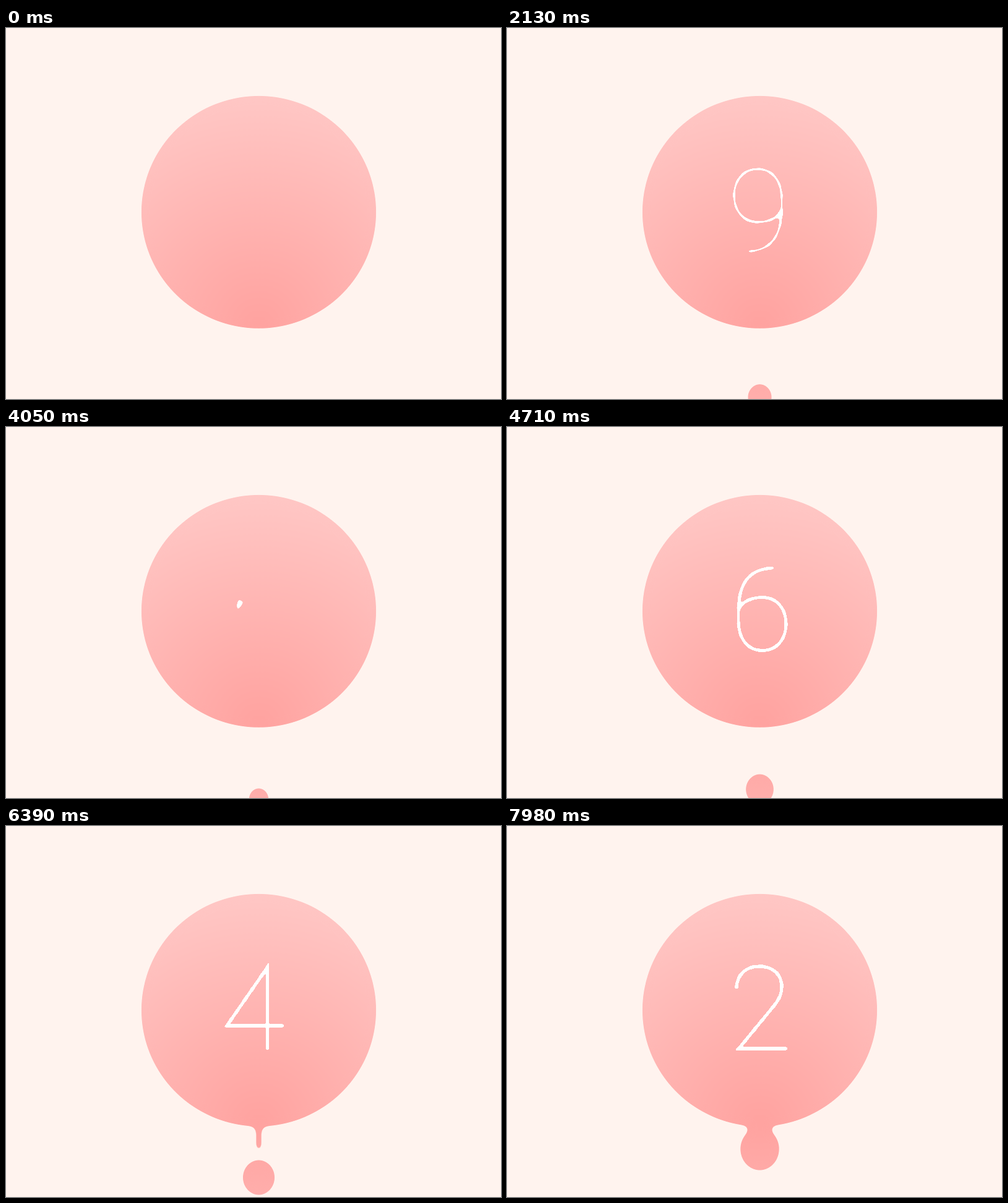
Animation, 800 px wide and 600 px high, one loop 8 s. Source, as an HTML page:

```html
<!DOCTYPE html>
<html lang="en">
<head>
<meta charset="utf-8">
<title>Dripping countdown</title>
<style>
  html, body { margin: 0; width: 100%; height: 100%; overflow: hidden; background: #fff3ee; }
  svg { display: block; width: 100vw; height: 100vh; }
</style>
</head>
<body>
<svg viewBox="0 0 800 600" role="img" aria-label="Countdown">
  <defs>
    <radialGradient id="pink" gradientUnits="userSpaceOnUse" cx="409" cy="480" r="372">
      <stop offset="0" stop-color="#ffa29f"/>
      <stop offset="1" stop-color="#ffc7c5"/>
    </radialGradient>
    <filter id="goo" filterUnits="userSpaceOnUse" x="0" y="0" width="800" height="600" color-interpolation-filters="sRGB">
      <feGaussianBlur stdDeviation="6"/>
      <feColorMatrix values="1 0 0 0 0  0 1 0 0 0  0 0 1 0 0  0 0 0 16 -7.5"/>
    </filter>
    <filter id="melt" filterUnits="userSpaceOnUse" x="260" y="190" width="300" height="210" color-interpolation-filters="sRGB">
      <feGaussianBlur id="blur" stdDeviation="0"/>
      <feColorMatrix values="0 0 0 0 1  0 0 0 0 1  0 0 0 0 1  0 0 0 40 -22"/>
    </filter>
  </defs>
  <rect width="800" height="600" fill="#fff3ee"/>
  <g fill="url(#pink)" filter="url(#goo)">
    <ellipse cx="408.5" cy="297.8" rx="189.7" ry="188"/>
    <g class="drip"><rect/><ellipse/></g>
    <g class="drip"><rect/><ellipse/></g>
  </g>
  <g id="digit" fill="none" stroke="#fff" filter="url(#melt)">
    <path stroke-width="5.4"/>
    <path stroke-width="6" stroke-dasharray="6 12 9 16 5 10 8 21"/>
  </g>
</svg>
<script>
const LOOP = 8000, STEP = 900, MID = 408.5;

const nine = 'M443 296C437 308 422 314 405 314C382 314 367 296 367 271C367 246 382 228 405 228' +
  'C430 228 444 248 444 276V290C444 336 428 361 386 361.5';

// Centre lines of the numerals, counting down from ten
const numerals = [
  'M313 248L354 230V362M461 227.5C486 227.5 500 245 500 278V311C500 344 486 361.5 461 361.5' +
    'C436 361.5 422 344 422 311V278C422 245 436 227.5 461 227.5Z',
  nine,
  'M409.5 227C432 227 446 240 446 260C446 279 431 292.5 409.5 292.5C388 292.5 373 279 373 260C373 240 387 227 409.5 227Z' +
    'M409.5 292.5C434 292.5 450.5 307 450.5 327C450.5 348 434 361.5 409.5 361.5C385 361.5 368.5 348 368.5 327C368.5 307 385 292.5 409.5 292.5Z',
  'M367 228.5H445.5L387 362',
  nine,
  'M447 228.5H382.5L376 291.5C384 283 396 279 409 279C432 279 446 297 446 320C446 345 432 361.5 409 361.5C387 361.5 373 348 372 326.5',
  'M422.5 362V228.5L357 323H449',
  'M372 261C373 240 388 227 408 227C431 227 445 240 445 260C445 280 430 291.5 406 291.5H395' +
    'M406 291.5C433 291.5 448 304 448 326C448 348 431 361.5 408 361.5C385 361.5 370 348 369 327',
  'M371 263C371 241 386 227 407 227C430 227 444 240 444 260C444 274 438 283 428 295L374.5 360H453'
];

const drips = [...document.querySelectorAll('.drip')];
const digit = document.getElementById('digit');
const blur = document.getElementById('blur');

function set(el, attrs) {
  for (const key in attrs) el.setAttribute(key, attrs[key]);
}

// p is the time since the drip's own beat began
function drawDrip(group, p) {
  const on = p > 540 && p < 1440;
  group.style.display = on ? '' : 'none';
  if (!on) return;

  const [neck, drop] = group.children;
  const left = Math.max(0, 1375 - p);
  const cy = 601.7 - 0.000225 * left * left - Math.max(0, 780 - p) * 0.06;
  const r = Math.max(0, 28.5 - 0.0265 * (p - 900) - Math.max(0, p - 1350) * 0.1);
  set(drop, { cx: MID, cy, rx: r, ry: r * 1.1 });

  const w = Math.min(1.3 * r, 8 + 28 * 4.6 ** ((780 - p) / 120));
  const end = Math.min(cy, 526 - 0.378 * (p - 990));
  set(neck, { x: MID - w / 2, y: 440, width: w, height: Math.max(0, end - 440) });
}

function drawDigit(t) {
  const n = Math.max(0, Math.floor((t - 451) / STEP));
  let d = t - n * STEP - STEP;
  if (n === 0 && d < 0) d *= 450 / 780;    // the first numeral gathers slowly
  const on = d > -450.5 && d <= 465 && n < numerals.length && !(n > 0 && d <= -450);
  digit.style.display = on ? '' : 'none';
  if (!on) return;
  for (const path of digit.children) {
    set(path, { d: numerals[n], transform: n === 4 ? 'rotate(180 409 294.75)' : '' });
  }
  blur.setAttribute('stdDeviation', Math.max(0.01, Math.abs(d) * 0.0103));
}

function draw(t) {
  const beat = Math.floor(t / STEP);
  const p = t - beat * STEP;
  drawDrip(drips[0], p);
  drawDrip(drips[1], beat > 0 ? p + STEP : -1);
  drawDigit(t);
}

const start = performance.now();
function tick() {
  draw((performance.now() - start) % LOOP);
  requestAnimationFrame(tick);
}
draw(0);
requestAnimationFrame(tick);
</script>
</body>
</html>
```
